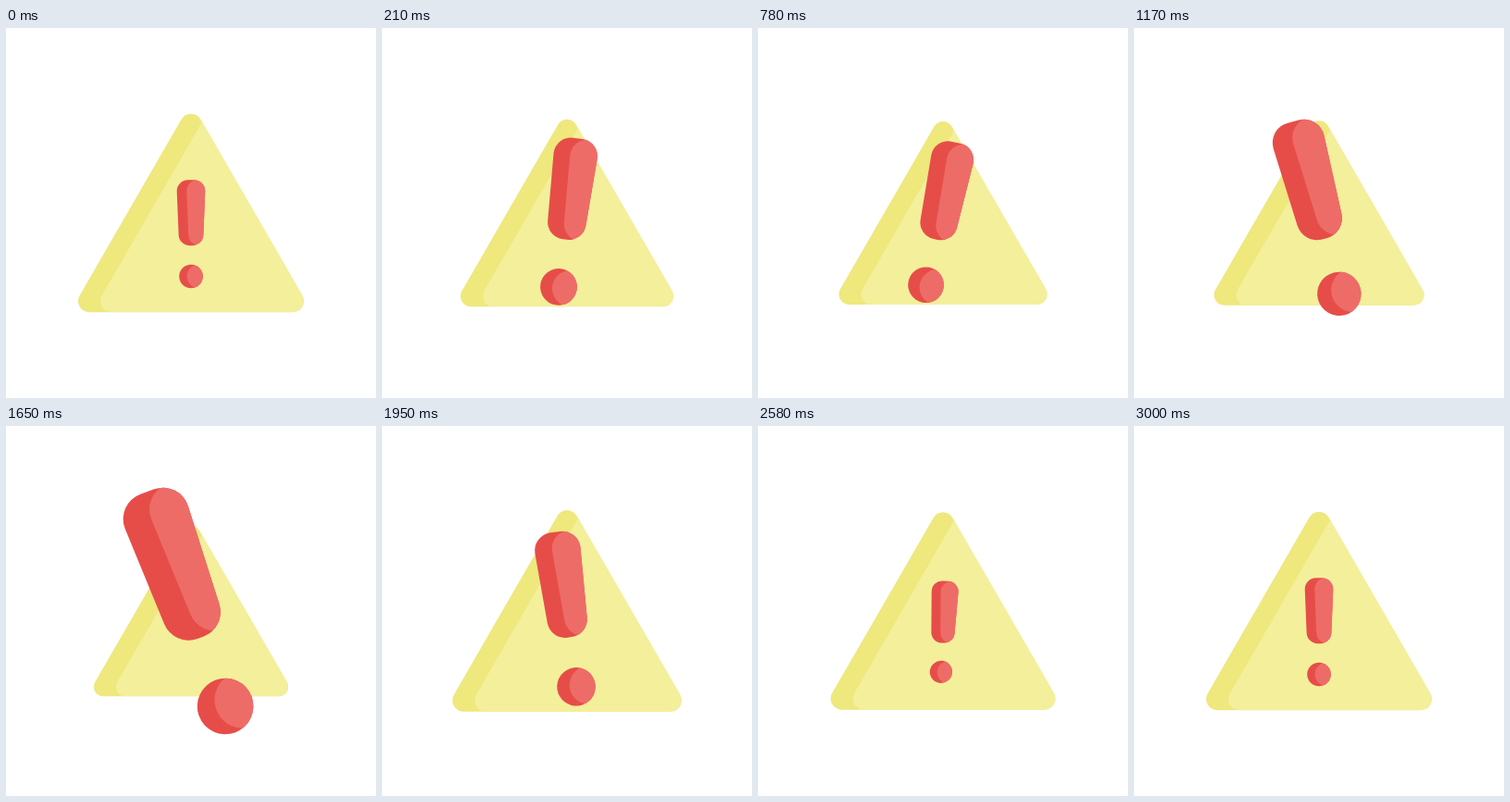
Recreate the animation shown at these times as an HTML page with a canvas. Size 400 px wide and 400 px high, loop 5030 ms.

```html
<!DOCTYPE html>
<html lang="en">
<head>
<meta charset="utf-8">
<title>Warning sign</title>
<style>
  html, body { margin: 0; width: 100%; height: 100%; overflow: hidden; background: #fff; }
  canvas { display: block; width: 100vw; height: 100vh; }
</style>
</head>
<body>
<canvas id="stage" width="400" height="400"></canvas>
<script>
const ctx = document.getElementById('stage').getContext('2d');
const LOOP = 5030, STEP = 30, END = 3000;
const YELLOW = '#f4ef9b', YELLOW_DARK = '#eee87d';
const RED = '#ee6c67', RED_DARK = '#e64d49';

const smooth = p => p * p * (3 - 2 * p);
const smoother = p => p * p * p * (p * (6 * p - 15) + 10);

// Eases between [time, value] keys and holds the end values
function tween(ease, ...keys) {
  return t => {
    const i = keys.findIndex(key => key[0] > t);
    if (i === 0) return keys[0][1];
    if (i < 0) return keys[keys.length - 1][1];
    const [t0, v0] = keys[i - 1], [t1, v1] = keys[i];
    return v0 + (v1 - v0) * ease((t - t0) / (t1 - t0));
  };
}

// The mark swings right, then left, then settles; the sign shrinks as it grows
const signScale = tween(smooth, [0, 1], [480, .861], [960, .951], [1640, .861],
  [2190, 1.12], [2700, .975], [END, 1]);
const markScale = tween(smooth, [0, 1], [480, 2.36], [900, 1.3], [1430, 2.37],
  [1640, 2.37], [2250, .905], [END, 1]);
const markAngle = tween(smoother, [0, 0], [480, 19], [1430, -20], [1640, -20],
  [2260, 4.5], [END, 0]);
const markX = tween(smooth, [480, 200], [780, 195.7], [1170, 200]);
const markY = scale => 185.2 + 37.5 / Math.max(scale, 1);

function rounded(points, r) {
  const path = new Path2D();
  const [a, b] = [points[0], points[points.length - 1]];
  path.moveTo((a[0] + b[0]) / 2, (a[1] + b[1]) / 2);
  points.forEach((p, i) => {
    const next = points[(i + 1) % points.length];
    path.arcTo(...p, ...next, r);
  });
  path.closePath();
  return path;
}

const sign = rounded([[0, -119.5], [130.8, 107], [-130.8, 107]], 12);
const bar = rounded([[-15.8, -58.4], [15.8, -58.4], [12.9, 12.5], [-12.9, 12.5]], 12);
const dot = new Path2D();
dot.arc(0, 45.8, 12.8, 0, Math.PI * 2);

// Dark shape with a light copy of itself, shifted right and clipped inside
function shaded(path, dark, light, shift) {
  ctx.fillStyle = dark;
  ctx.fill(path);
  ctx.save();
  ctx.clip(path);
  ctx.translate(shift, 0);
  ctx.fillStyle = light;
  ctx.fill(path);
  ctx.restore();
}

function place(x, y, scale, degrees, paint) {
  ctx.save();
  ctx.translate(x, y);
  ctx.rotate(degrees * Math.PI / 180);
  ctx.scale(scale, scale);
  paint();
  ctx.restore();
}

function draw(t) {
  ctx.fillStyle = '#fff';
  ctx.fillRect(0, 0, 400, 400);
  const size = signScale(t), grow = markScale(t);
  // The sign's dark band keeps its width on screen
  place(200, 200.2, size, 0, () => shaded(sign, YELLOW_DARK, YELLOW, 24 / size));
  place(markX(t), markY(grow), grow, markAngle(t), () => {
    shaded(bar, RED_DARK, RED, 9 + 1.6 * grow);
    shaded(dot, RED_DARK, RED, 8.4);
  });
}

function tick() {
  const t = performance.now() % LOOP;
  draw(Math.min(Math.floor(t / STEP) * STEP, END));
  requestAnimationFrame(tick);
}
tick();
</script>
</body>
</html>
```
